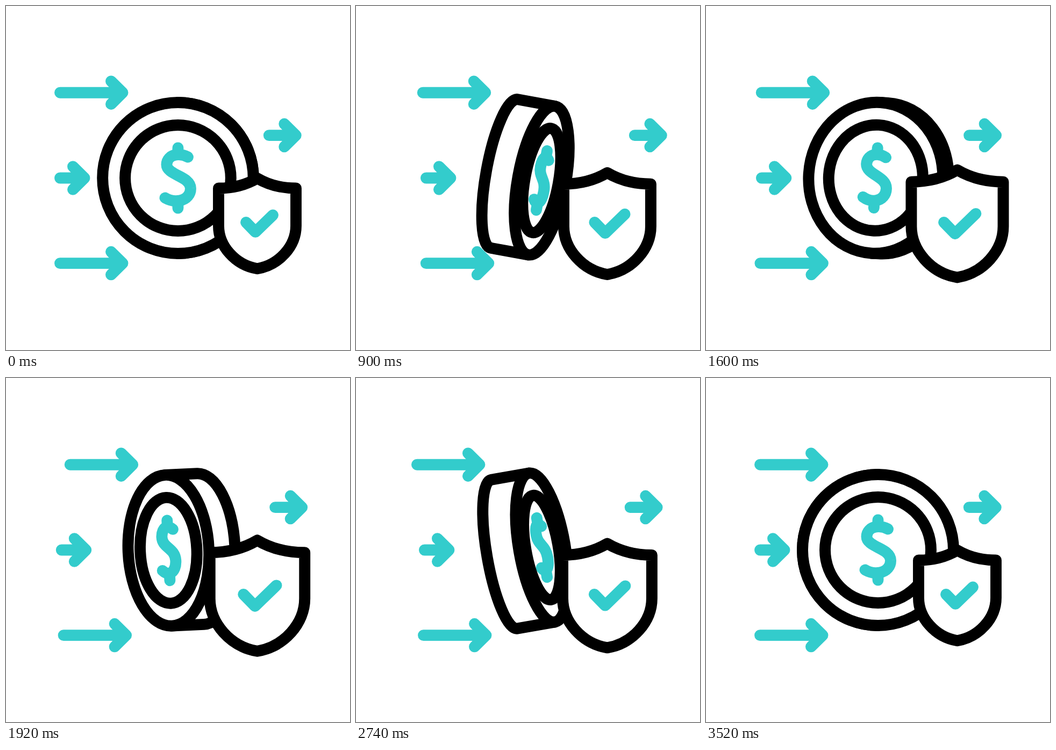
Write an HTML page that moves like this. It is 640x640 px and loops after 3600 ms.

```html
<!DOCTYPE html>
<html lang="en">
<head>
<meta charset="utf-8">
<title>Secure payment</title>
<style>
  html, body { margin: 0; width: 100%; height: 100%; overflow: hidden; background: #fff; }
  svg { display: block; width: 100%; height: 100%; }
  svg * { vector-effect: non-scaling-stroke; }
  g { fill: none; stroke-width: 20.9; stroke-linecap: round; stroke-linejoin: round; }
  .ink { stroke: #000; }
  .teal { stroke: #33cccc; }
  .paper { fill: #fff; }
</style>
</head>
<body>
<svg viewBox="0 0 640 640">
  <g id="coin" class="ink">
    <path id="side" class="paper"/>
    <ellipse id="rim" class="paper" ry="140.5"/>
    <g id="dollar" class="teal">
      <path d="M18.5 -39C11 -43 2 -44 -4 -43C-14 -42 -21 -34 -21 -25C-21 -5 23 -4 23.5 19C24 30 16 40 3 42C-7 44 -17 41 -24 37M0 -56V-46M0 46V56"/>
    </g>
    <ellipse id="ring" ry="98.5"/>
  </g>
  <g id="shield" class="ink">
    <path class="paper" d="M0 -82C22 -69 47 -63.4 72 -63.4V6.5C72 44 41 79.5 0 86.4C-41 79.5 -72 44 -72 6.5V-63.4C-47 -63.4 -22 -69 0 -82Z"/>
    <path class="teal" d="M-21 0L-3.5 18L29 -13.5"/>
  </g>
  <g id="arrows" class="teal"></g>
</svg>
<script>
const LOOP = 3600, R = 140.5;
const $ = id => document.getElementById(id);
const set = (el, attrs) => { for (const k in attrs) el.setAttribute(k, attrs[k]); };
const sine = u => (1 - Math.cos(Math.PI * u)) / 2;
const linear = u => u;

// Position on a list of key times: current segment and progress within it.
function locate(times, t) {
  const last = times.length - 2;
  let i = 0;
  while (i < last && t >= times[i + 1]) i++;
  const u = (t - times[i]) / (times[i + 1] - times[i]);
  return { i, u: Math.min(1, Math.max(0, u)) };
}

// Swings 0, 1, 0, 1 ... between the key times.
function swing(times, t, ease) {
  const { i, u } = locate(times, t);
  return i % 2 ? 1 - ease(u) : ease(u);
}

function tween(times, values, t) {
  const { i, u } = locate(times, t);
  return values[i] + (values[i + 1] - values[i]) * sine(u);
}

// Tail x, y, length and swing times.
const arrows = [
  [100.5, 161.2, 116.5, [0, 668, 1440, 2270, 3136]],
  [100.5, 320, 45.5, [0, 927, 1770, 2540, 3510]],
  [100.5, 478.6, 116.5, [0, 860, 1660, 2500, 3400]],
  [489.3, 240.6, 50, [0, 820, 1540, 2440, 3250]]
].map(([x, y, len, times]) => {
  const el = document.createElementNS('http://www.w3.org/2000/svg', 'path');
  set(el, { d: `M0 0H${len}m-21.5 -21.3l21.5 21.3l-21.5 21.3` });
  $('arrows').append(el);
  return { el, x, y, times };
});

const turnTimes = [0, 621, 1500, 2405, 3500];
const tiltTimes = [0, 950, 2620, 3520];
const pulseTimes = [0, 600, 1200, 1800, 2400, 3000, 3520];

function drawCoin(t) {
  const turn = swing(turnTimes, t, linear);
  const dir = locate(turnTimes, t).i % 2 ? -1 : 1;
  const width = Math.max(0.004, 1 - turn);
  const front = -dir * 38 * turn;
  const back = dir * 45 * Math.min(1, 2 * turn);
  const backRx = R * width ** 1.25;
  const tilt = tween(tiltTimes, [0, 10.4, -10.4, 0], t);

  set($('coin'), { transform: `translate(320 320) rotate(${tilt})` });
  set($('side'), {
    d: `M${front} ${-R}H${back}A${backRx} ${R} 0 0 ${dir > 0 ? 1 : 0} ${back} ${R}H${front}Z`
  });
  set($('rim'), { cx: front, rx: R * width });
  set($('ring'), { cx: front, rx: 98.5 * width });
  set($('dollar'), { transform: `translate(${front} 0) scale(${width} 1)` });
}

function draw(t) {
  drawCoin(t);
  const size = 1 + 0.25 * swing(pulseTimes, t, sine);
  set($('shield'), { transform: `translate(467.5 402.4) scale(${size})` });
  for (const a of arrows) {
    const dx = 30 * swing(a.times, t, sine);
    set(a.el, { transform: `translate(${a.x + dx} ${a.y})` });
  }
}

const start = performance.now();
function tick() {
  draw((performance.now() - start) % LOOP);
  requestAnimationFrame(tick);
}
tick();
</script>
</body>
</html>
```
